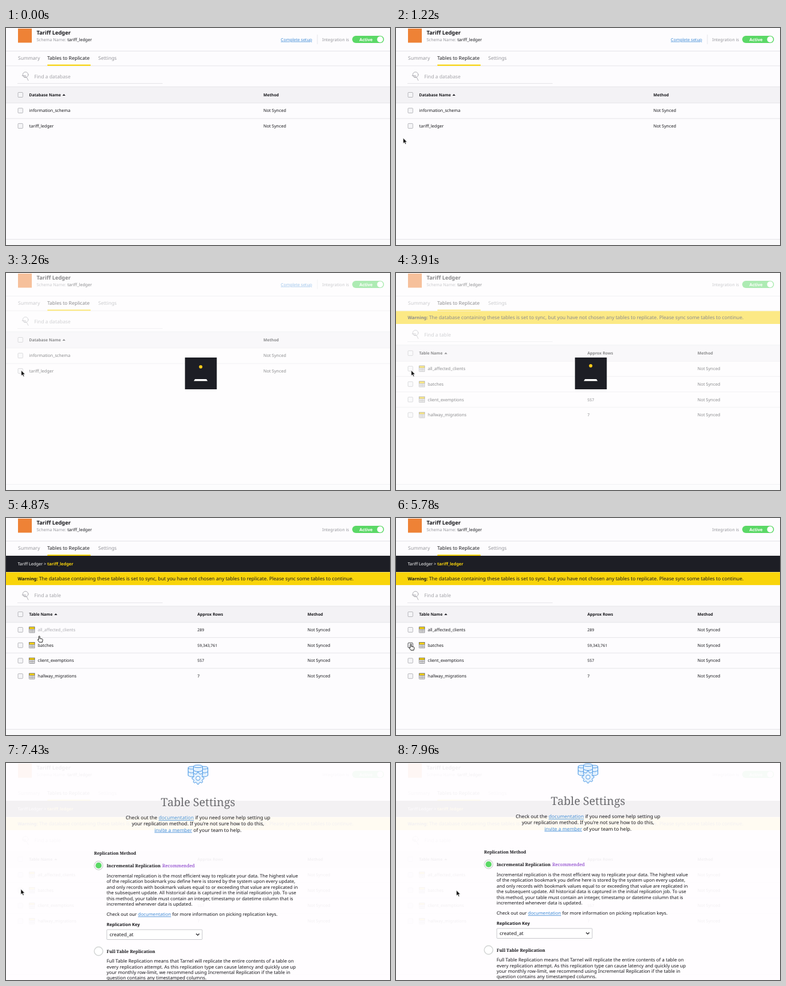
An HTML page that plays this animation: 640 by 362 pixels, repeating every 8000 ms.

```html
<!DOCTYPE html>
<html lang="en">
<head>
<meta charset="utf-8">
<title>Table replication walkthrough</title>
<style>
  html, body { margin: 0; width: 100%; height: 100%; overflow: hidden; background: #fdfcfe; }
  svg { display: block; width: 100%; height: 100%; }
  text { font: 7.1px 'Noto Sans', 'Open Sans', sans-serif; fill: #17171b; text-rendering: geometricPrecision; white-space: pre; }
  .medium { font-weight: 500; }
  .bold { font-weight: 700; }
  .grey { fill: #97979c; }
  .hint { font-size: 8.2px; fill: #a3a3a8; }
  .tab { font-size: 8.1px; }
  .head { font-size: 6.65px; font-weight: 700; }
  .num { font-size: 6.5px; }
  .link { fill: #3f8bd6; text-decoration: underline; text-decoration-thickness: .6px; }
  .serif { font-family: 'Noto Serif', serif; font-weight: 700; }
  .mid { font-size: 8.17px; text-anchor: middle; }
  .para { font-size: 7.66px; }
  .line { stroke: #e6e5e9; stroke-width: 1; }
  .box { fill: #f6f6f8; stroke: #a9a9ae; stroke-width: .8; }
  .ring { fill: #fff; stroke: #d3d5d5; stroke-width: 1.4; }
  .blue { fill: #e4f1fd; stroke: #4f9ae6; stroke-width: 1; stroke-linejoin: round; }
</style>
</head>
<body>
<svg id="stage" viewBox="0 0 640 362"></svg>
<script>
const LOOP = 8000;
const YELLOW = '#f9d40a', DARK = '#1d1e25', GREEN = '#5bd866';

const text = (x, y, str, cls = '', extra = '') => `<text x="${x}" y="${y}" class="${cls}" ${extra}>${str}</text>`;
const rect = (x, y, w, h, fill, extra = '') => `<rect x="${x}" y="${y}" width="${w}" height="${h}" fill="${fill}" ${extra}/>`;
const rule = (y, x1 = 0, x2 = 640) => `<path class="line" d="M${x1} ${y}H${x2}"/>`;
const link = str => `<tspan class="link">${str}</tspan>`;
const checkbox = (y, id = '') => `<rect ${id && `id="${id}"`} class="box" x="20" y="${y - 4}" width="8" height="8" rx="1"/>`;
const lines = (x, y, step, cls, rows, extra = '') => rows.map((row, i) => text(x, y + i * step, row, cls, extra)).join('');

const search = (y, label) => `
  <g fill="none" stroke="#a9a9ae" stroke-width=".9" stroke-linecap="round">
    <circle cx="32.5" cy="${y - 2.5}" r="4.6"/>
    <path d="M34.5 ${y + 2}l2.6 5M27 ${y - 1}h6M29.5 ${y + 1}h4"/>
  </g>
  ${text(47, y + 3, label, 'hint')}${rule(y + 12, 19, 261)}`;

const tableHead = (y, name, arrowX) => `
  ${rect(0, y - 13.5, 640, 27, '#f3f2f5')}${rule(y - 13.5)}${rule(y + 13.5)}
  ${checkbox(y)}${text(38.5, y + 2.5, name, 'head')}
  <path d="M${arrowX} ${y + 1.5}l2.5-3 2.5 3z" fill="#26262b"/>`;

const gridIcon = y => `
  <g stroke="#55555b" stroke-width=".6">
    ${rect(38.8, y - 4.6, 9, 9.2, '#fff')}${rect(38.8, y - 4.6, 9, 3.4, YELLOW)}
    <path d="M38.8 ${y + 1.7}h9M41.8 ${y - 1.2}v5.8M44.8 ${y - 1.2}v5.8"/>
  </g>`;

const tableRow = ([name, count], i) => {
  const y = 159.6 + i * 25.75;
  return `${checkbox(y, 'check' + i)}${gridIcon(y)}
    ${text(53, y + 2.5, name, 'medium', `id="name${i}"`)}
    ${text(319, y + 2.5, count, 'medium num')}${text(502.5, y + 2.5, 'Not Synced', 'medium')}
    ${i < 3 ? rule(y + 12.9) : ''}`;
};

const header = `
  ${rect(20, 1, 23, 23.5, '#ee8236')}
  ${text(51, 10.5, 'Tariff Ledger', 'bold', 'style="font-size:8.95px"')}
  ${text(51, 21.7, 'Schema Name:', 'grey', 'style="font-size:6.95px"')}
  ${text(102.3, 21.7, 'tariff_ledger', 'medium')}
  <g id="setup">${text(458, 21.7, 'Complete setup', 'link', 'style="font-size:7px"')}
    <path class="line" d="M519 11v16"/></g>
  ${text(527, 21.7, 'Integration is', 'grey')}
  ${rect(577, 13, 53, 12, GREEN, 'rx="6"')}
  ${text(589, 21.7, 'Active', 'bold', 'style="fill:#fff"')}
  <circle cx="623.5" cy="19" r="5" fill="#fff"/>
  ${rule(38.5)}
  ${text(20, 53, 'Summary', 'tab grey')}
  ${text(68.7, 53, 'Tables to Replicate', 'tab medium')}
  ${text(153.7, 53, 'Settings', 'tab grey')}
  ${rule(63)}${rect(69, 61, 72, 2, YELLOW)}
  ${rect(0, 353, 640, 9, '#fafafb')}${rule(352.5)}`;

const databases = `<g id="databases">
  ${search(80.5, 'Find a database')}
  ${tableHead(111.5, 'Database Name', 94)}${text(429, 114, 'Method', 'head')}
  ${['information_schema', 'tariff_ledger'].map((name, i) => {
    const y = 137.8 + i * 25.6;
    return checkbox(y, 'db' + i) + text(38.7, y + 2.5, name, 'medium') + text(429, y + 2.5, 'Not Synced', 'medium');
  }).join('')}
  ${rule(151)}</g>`;

const tables = `<g id="tables">
  ${rect(0, 63.5, 640, 21.5, YELLOW)}
  ${text(19.5, 77, 'Warning:', 'bold', 'style="font-size:7.4px"')}
  ${text(55, 77, 'The database containing these tables is set to sync, but you have not chosen any tables to replicate. Please sync some tables to continue.', '', 'style="font-size:8.18px"')}
  ${search(102.5, 'Find a table')}
  ${tableHead(133.7, 'Table Name', 80.5)}
  ${text(319, 136.2, 'Approx Rows', 'head')}${text(502.5, 136.2, 'Method', 'head')}
  ${[['all_affected_clients', '289'], ['batches', '59,343,761'], ['client_exemptions', '557'], ['hallway_migrations', '7']].map(tableRow).join('')}
  </g>
  <g id="crumbs">${rect(0, 63, 640, 27, DARK)}
  ${text(19.5, 78.5, `Tariff Ledger &gt; <tspan class="bold" style="fill:${YELLOW}">tariff_ledger</tspan>`, 'medium', 'style="fill:#fff;font-size:7px"')}</g>`;

const loader = `<g id="loader">${rect(298.3, 141, 53, 53, DARK)}
  <circle id="ball" cx="324.5" r="2.8" fill="#fbc91b"/>
  <path d="M313 180.3l2-3.3h19l2 3.3z" fill="#fff"/></g>`;

const cylinder = (x, y, w, h) => `
  <path class="blue" d="M${x} ${y}v${h}q${w / 2} 4 ${w} 0v${-h}"/>
  <path class="blue" style="fill:none" d="M${x} ${y + h / 2}q${w / 2} 4 ${w} 0"/>
  <ellipse class="blue" cx="${x + w / 2}" cy="${y}" rx="${w / 2}" ry="2.2"/>`;

const gear = (cx, cy, r) => {
  const points = [];
  for (let i = 0; i < 32; i++) {
    const radius = i % 4 < 2 ? r : r - 2.3, angle = (i - .5) * Math.PI / 16;
    points.push(`${(cx + radius * Math.cos(angle)).toFixed(2)},${(cy + radius * Math.sin(angle)).toFixed(2)}`);
  }
  return `<polygon class="blue" points="${points.join(' ')}"/><circle class="blue" cx="${cx}" cy="${cy}" r="3.4" style="fill:#fff"/>`;
};

const radio = (y, id) => `<circle class="ring" cx="154.3" cy="${y}" r="7.2"/><circle id="${id}" cx="154.3" cy="${y}" r="5.1" fill="${GREEN}"/>`;

const modal = `<g id="modal">${rect(0, 0, 640, 362, '#fffdff', 'opacity=".945"')}
  <g id="sheet">
  ${cylinder(303.5, 8, 12, 13)}${cylinder(324.5, 8, 12, 13)}${cylinder(312.5, 5.5, 15, 14)}${gear(320, 25.5, 10)}
  ${text(320, 71.5, 'Table Settings', 'serif', 'style="font-size:18.8px;font-weight:400;fill:#6c6c70;text-anchor:middle"')}
  ${lines(320, 94.3, 10.1, 'mid', [
    `Check out the ${link('documentation')} if you need some help setting up`,
    "your replication method. If you're not sure how to do this,",
    `${link('invite a member')} of your team to help.`])}
  ${text(146.7, 153.3, 'Replication Method', 'serif')}
  ${radio(171, 'incremental')}
  ${text(167.7, 174.4, 'Incremental Replication', 'serif', 'style="font-size:7.3px"')}
  ${text(260.5, 174.4, 'Recommended', 'serif', 'style="font-size:7.6px;font-weight:500;fill:#7a28c4"')}
  ${lines(167.7, 190.6, 9.5, 'para', [
    'Incremental replication is the most efficient way to replicate your data. The highest value',
    'of the replication bookmark you define here is stored by the system upon every update,',
    'and only records with bookmark values equal to or exceeding that value are replicated in',
    'the subsequent update. All historical data is captured in the initial replication job. To use',
    'this method, your table must contain an integer, timestamp or datetime column that is',
    'incremented whenever data is updated.'])}
  ${text(167.7, 255.2, `Check out our ${link('documentation')} for more information on picking replication keys.`, 'para')}
  ${text(167.7, 272, 'Replication Key', 'bold', 'style="font-size:7.2px"')}
  ${rect(168, 278, 159, 16.5, '#fff', 'stroke="#c3c3c8" stroke-width=".9" rx="1"')}
  ${text(172.7, 289.3, '', '', 'id="key" style="font-size:8.1px"')}
  <path d="M316.8 284.8l2.7 2.6 2.7-2.6" fill="none" stroke="#2d2d31" stroke-width="1.4"/>
  ${radio(314, 'full')}
  ${text(167.7, 317.3, 'Full Table Replication', 'serif', 'style="font-size:7.3px"')}
  ${lines(167.7, 333.2, 9.4, 'para', [
    'Full Table Replication means that Tarnel will replicate the entire contents of a table on',
    'every replication attempt. As this replication type can cause latency and quickly use up',
    'your monthly row-limit, we recommend using Incremental Replication if the table in',
    'question contains any timestamped columns.'], 'style="font-size:7.8px"')}
  </g></g>`;

const cursor = `<g id="cursor">
  <path id="arrow" d="M0 0v9.2l2.1-1.9 1.5 3.3 1.6-.7-1.5-3.2h2.9z" fill="#111" stroke="#fff" stroke-width=".7"/>
  <path id="hand" d="M-.9 .4q.9-1 1.8 0v3.6l4 .9q1 .3.8 1.5l-.7 3.8h-5l-2.8-4q0-1.2 1.9-.1z" fill="#fff" stroke="#111" stroke-width=".9" stroke-linejoin="round"/></g>`;

const stage = document.getElementById('stage');
stage.innerHTML = rect(0, 0, 640, 362, '#fdfcfe') + header + databases + tables +
  rect(0, 0, 640, 362, '#fff', 'id="veil"') + loader + modal + cursor;

const el = Object.fromEntries([...stage.querySelectorAll('[id]')].map(node => [node.id, node]));

// Pointer path: time, x, y
const path = [
  [60, 60, 368], [820, 14, 197], [1600, 10, 171], [2000, 8.5, 168], [2330, 25, 164], [2900, 25, 164],
  [3300, 25.3, 162.3], [4350, 25.3, 162.3], [4820, 55.5, 197], [5000, 55.5, 197], [5420, 17, 209],
  [5650, 24.7, 210.3], [7460, 24.7, 210.3], [7930, 100.7, 212.3], [8000, 100.7, 212.3]
];

const ramp = (t, from, to) => Math.min(1, Math.max(0, (t - from) / (to - from)));
const within = (t, from, to) => t >= from && t < to;
const show = (node, on) => node.setAttribute('visibility', on ? 'visible' : 'hidden');
const fade = (node, value) => node.setAttribute('opacity', value);
const move = (node, x, y) => node.setAttribute('transform', `translate(${x} ${y})`);
const hover = (node, on) => { node.style.stroke = on ? '#26262b' : ''; };

function pointerAt(t) {
  const next = path.findIndex(step => step[0] > t);
  if (next < 1) return path[0].slice(1);
  const [t0, x0, y0] = path[next - 1], [t1, x1, y1] = path[next];
  const p = ramp(t, t0, t1), eased = p * p * (3 - 2 * p);
  return [x0 + (x1 - x0) * eased, y0 + (y1 - y0) * eased];
}

function render(t) {
  const onTables = t >= 3400, opened = t >= 4200, picked = t >= 6850, keyed = t >= 7200;
  show(el.databases, !onTables);
  show(el.setup, !onTables);
  show(el.tables, onTables);
  show(el.crumbs, opened);
  move(el.tables, 0, opened ? 26.9 : 0);

  const busy = ramp(t, 2620, 2800) - ramp(t, 4200, 4420) + ramp(t, 5860, 6000) - ramp(t, 6200, 6400);
  fade(el.veil, busy * .5);
  fade(el.loader, busy);
  el.ball.setAttribute('cy', 174 - 20 * Math.abs(Math.sin(Math.PI * t / 700)));

  fade(el.modal, ramp(t, 6170, 6400));
  move(el.sheet, 0, -2 * ramp(t, 7900, 7950));
  show(el.full, !picked);
  show(el.incremental, picked);
  el.key.textContent = keyed ? 'created_at' : 'Select a Column';
  el.key.style.fill = keyed ? '' : '#85858a';

  hover(el.db1, within(t, 2200, 2650));
  hover(el.check1, within(t, 5450, 5860));
  el.name0.style.fill = within(t, 4700, 5080) ? '#a9a9ae' : '';

  const hand = within(t, 2200, 2700) || within(t, 4620, 5120) || within(t, 5450, 5860);
  show(el.hand, hand);
  show(el.arrow, !hand);
  move(el.cursor, ...pointerAt(t));
}

function tick() {
  render(performance.now() % LOOP);
  requestAnimationFrame(tick);
}
tick();
</script>
</body>
</html>
```
